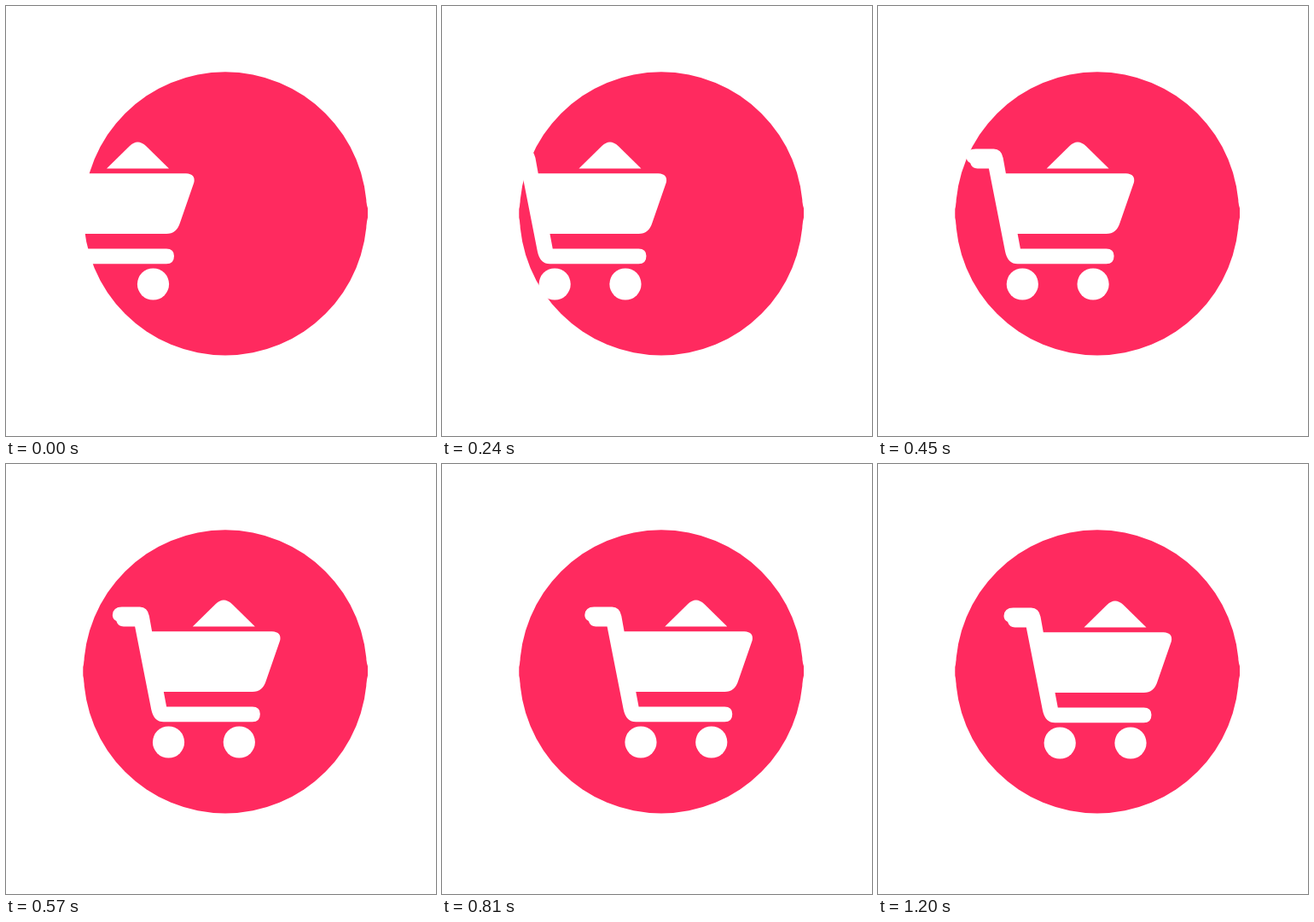
These frames come from a looping animation (504x504 px, 1.87 s). An HTML page with a canvas:

```html
<!DOCTYPE html>
<html lang="en">
<head>
<meta charset="utf-8">
<title>Shopping cart</title>
<style>
  html, body { margin: 0; width: 100%; height: 100%; overflow: hidden; background: #fff; }
  canvas { display: block; width: 504px; height: 504px; }
</style>
</head>
<body>
<canvas id="stage" width="504" height="504"></canvas>
<script>
const ctx = document.getElementById('stage').getContext('2d');
const LOOP = 1870, STEP = 30, TURN = 900, STOP = 1200;

const frame = new Path2D(`
  M157 167.5 H178 Q187 167.5 189 178 L192.3 196.3 H333
  Q344.5 197 342.3 207 L326 254 Q322 267 310 267
  H206 L209.3 284.5 H310 Q319 284.5 319 293 Q319 302.3 310 302.3
  H206 Q194.5 302.3 191.5 288 L172.3 190.5 H159
  Q152.5 190.5 150.5 184 Q146 182 146 177 Q146.5 167.5 157 167.5 Z`);
const goods = new Path2D('M240 190.5 L267 164 Q276.3 155 286 164 L313 190.5 Z');

function disc(x, y, r) {
  ctx.beginPath();
  ctx.arc(x, y, r, 0, Math.PI * 2);
  ctx.fill();
}

// Rolls right at constant speed, then back more slowly while sinking one pixel.
function cartOffset(t) {
  if (t <= TURN) return [-122 + 159.2 * t / TURN, 0];
  const back = Math.min(1, (t - TURN) / (STOP - TURN));
  return [37.2 - 35.7 * back, back];
}

function draw(t) {
  ctx.fillStyle = '#fff';
  ctx.fillRect(0, 0, 504, 504);

  ctx.fillStyle = '#ff2a5f';
  disc(257, 243.4, 166.1);
  ctx.fill(new Path2D('M422 230 L424 237 V248 L422 257 Z M92 230 L90.3 238 V248 L92 257 Z'));

  ctx.save();
  ctx.translate(...cartOffset(t));
  ctx.fillStyle = '#fff';
  ctx.fill(frame);
  ctx.fill(goods);
  disc(211.7, 326, 18.6);
  disc(294.5, 326, 18.6);
  ctx.restore();
}

const start = performance.now();
function tick() {
  const t = (performance.now() - start) % LOOP;
  draw(Math.floor(t / STEP) * STEP);
  requestAnimationFrame(tick);
}
tick();
</script>
</body>
</html>
```
